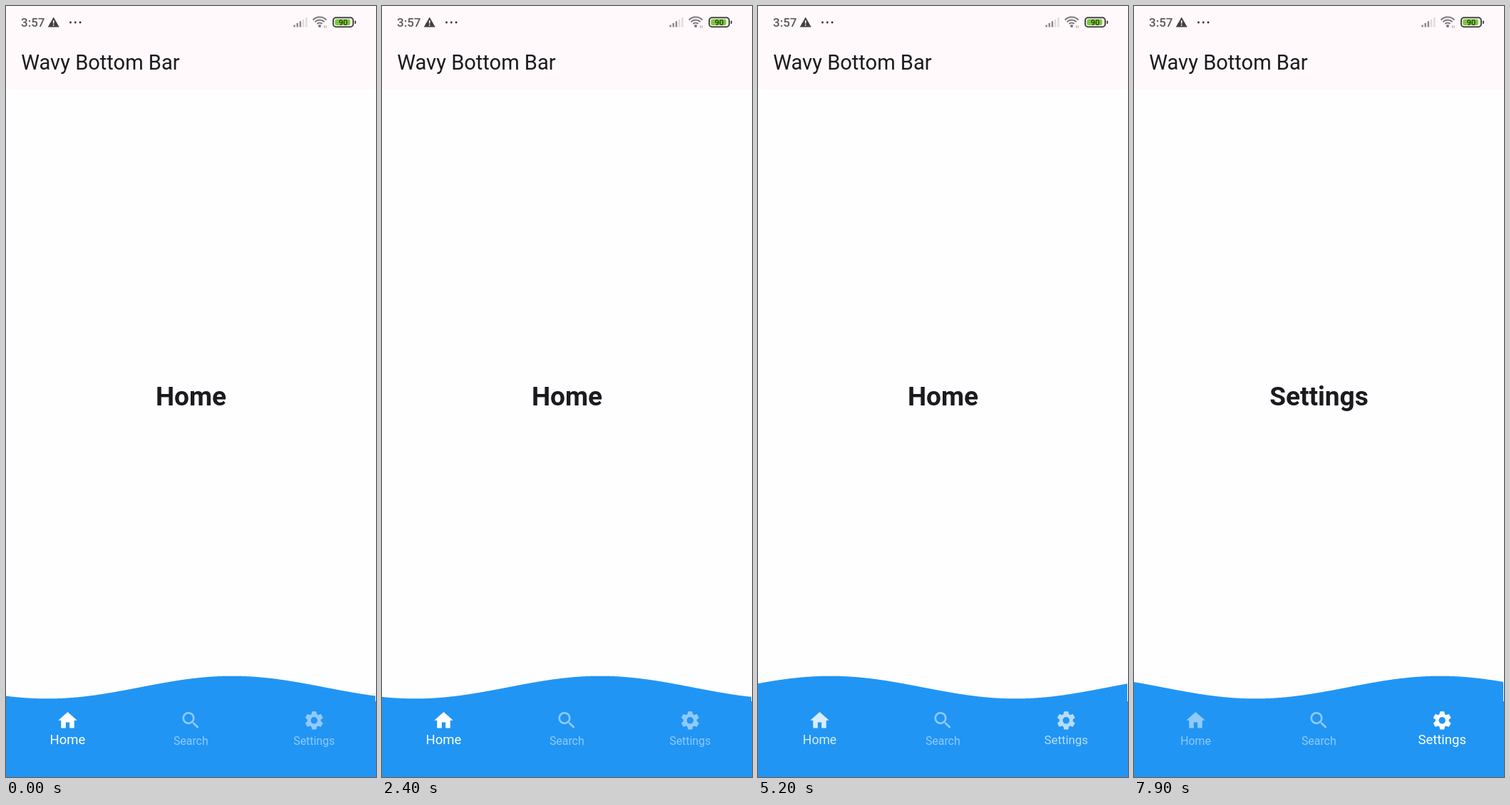
Write an HTML page with a canvas that moves like this. It is 519 px wide and 1079 px high and loops after 8 s.

```html
<!DOCTYPE html>
<html lang="en">
<head>
<meta charset="utf-8">
<title>Wavy Bottom Bar</title>
<style>
html, body { margin: 0; width: 100%; height: 100%; overflow: hidden; background: #fefdff; }
canvas { display: block; }
</style>
</head>
<body>
<canvas id="stage" width="519" height="1079"></canvas>
<script>
const ctx = document.getElementById('stage').getContext('2d');
const W = 519, H = 1079, LOOP = 8000, STEP = 100;
const DP = W / 392.73;
const BLUE = '#2195f4', INK = '#1b1a1f';

function gearPath() {
  const tooth = [[-2.75, -6.65], [-2.39, -9.19], [-1.91, -9.6], [1.91, -9.6], [2.39, -9.19], [2.75, -6.65]];
  const path = new Path2D();
  for (let i = 0; i < 6; i++) {
    const c = Math.cos(i * Math.PI / 3), s = Math.sin(i * Math.PI / 3);
    for (const [x, y] of tooth) path.lineTo(12 + x * c - y * s, 12 + x * s + y * c);
  }
  path.closePath();
  path.moveTo(15.6, 12);
  path.arc(12, 12, 3.6, 0, 7);
  return path;
}

const tabs = [
  { name: 'Home', x: 86.5, icon: new Path2D('M10 20v-6h4v6h5v-8h3L12 3 2 12h3v8z') },
  { name: 'Search', x: 259.3, icon: new Path2D('M15.5 14h-.79l-.28-.27A6.5 6.5 0 1 0 13.73 14.43l.27.28v.79l5 4.99L20.49 19zM9.5 14a4.5 4.5 0 1 1 0-9 4.5 4.5 0 0 1 0 9z') },
  { name: 'Settings', x: 432.2, icon: gearPath() }
];

// [time, tab]
const taps = [[-1000, 0], [3670, 1], [4430, 2], [5116, 0], [5850, 1], [6800, 2]];

// [time, x of the wave's trough]; the pace drifts slightly
const drift = [[0, 577], [300, 577], [1700, 235], [3200, -169], [4100, -403], [5200, -677], [6200, -941], [7900, -1387]];

// cubic-bezier(.4, 0, .2, 1)
function ease(p) {
  if (p >= 1) return 1;
  let lo = 0, hi = 1, s;
  for (let i = 0; i < 20; i++) {
    s = (lo + hi) / 2;
    const x = 1.2 * (1 - s) ** 2 * s + 0.6 * (1 - s) * s * s + s ** 3;
    if (x < p) lo = s; else hi = s;
  }
  return s * s * (3 - 2 * s);
}

function troughAt(t) {
  const i = drift.findIndex(([time]) => time >= t);
  if (i < 1) return drift[0][1];
  const [t0, x0] = drift[i - 1], [t1, x1] = drift[i];
  return x0 + (x1 - x0) * (t - t0) / (t1 - t0);
}

function text(str, x, y, size, color, weight = 400, align = 'center') {
  ctx.font = `${weight} ${size}px Roboto, sans-serif`;
  ctx.textAlign = align;
  ctx.fillStyle = color;
  ctx.fillText(str, x, y);
}

function rect(x, y, w, h, color) {
  ctx.fillStyle = color;
  ctx.fillRect(x, y, w, h);
}

function rounded(x, y, w, h, r) {
  ctx.beginPath();
  ctx.roundRect(x, y, w, h, r);
}

function dot(x, y, r, color) {
  ctx.fillStyle = color;
  ctx.beginPath();
  ctx.arc(x, y, r, 0, 7);
  ctx.fill();
}

function drawStatus() {
  text('3:57', 21, 29, 17, '#5c5a5d', 500, 'left');

  ctx.fillStyle = '#434145';
  ctx.fill(new Path2D('M66.7 15.5L74.7 29.5H58.7z'));
  rect(65.9, 20, 1.6, 4.6, '#fff9fc');
  rect(65.9, 26, 1.6, 1.6, '#fff9fc');
  for (let i = 0; i < 3; i++) dot(90.5 + i * 6.8, 23, 1.4, '#29282b');

  for (let i = 0; i < 5; i++) {
    const h = 3 + i * 2.6;
    rect(403.3 + i * 4.2, 29.5 - h, 2.4, h, i < 3 ? '#89868a' : '#dedadd');
  }

  ctx.strokeStyle = '#79777b';
  ctx.lineWidth = 2;
  for (const r of [5, 9, 13]) {
    ctx.beginPath();
    ctx.arc(440, 28.5, r, -Math.PI * 0.76, -Math.PI * 0.24);
    ctx.stroke();
  }
  dot(440, 28, 2, '#79777b');
  rect(446, 27, 1, 4, '#a5a2a6');
  rect(448.5, 27, 1, 4, '#a5a2a6');

  ctx.strokeStyle = '#474648';
  rounded(459, 16.2, 28, 13, 4);
  ctx.stroke();
  ctx.fillStyle = '#7bcb35';
  rounded(461.3, 18.5, 21.5, 8.6, 2);
  ctx.fill();
  ctx.fillStyle = '#474648';
  rounded(489, 20.5, 2, 4.5, 1);
  ctx.fill();
  text('90', 473, 26.8, 11, '#26351a', 500);
}

function drawWave(trough) {
  ctx.fillStyle = BLUE;
  ctx.beginPath();
  ctx.moveTo(0, 974);
  for (let x = 0; x <= W - 1; x++) {
    ctx.lineTo(x, 953.5 + 12 * DP * Math.cos(2 * Math.PI * (x - trough) / W));
  }
  ctx.lineTo(W - 1, 974);
  ctx.fill();
  rect(0, 973, W, H - 973, BLUE);
}

function drawTab({ name, x, icon }, on) {
  const color = `rgba(255,255,255,${0.5 + 0.5 * on})`;
  const size = (12 + 2 * on) * DP;
  ctx.save();
  ctx.translate(x - 12 * DP, 984);
  ctx.scale(DP, DP);
  ctx.fillStyle = color;
  ctx.fill(icon, 'evenodd');
  ctx.restore();
  text(name, x, 1037.5 - size * 0.244, size, color);
}

function draw(t) {
  const now = taps.findLastIndex(([time]) => time <= t);
  const [start, current] = taps[now];
  const previous = now ? taps[now - 1][1] : -1;
  const p = ease((t - start) / 200);

  rect(0, 0, W, H, '#fefdff');
  rect(0, 0, W, 116, '#fff9fc');
  drawStatus();
  text('Wavy Bottom Bar', 21.2, 89, 22 * DP, INK, 400, 'left');
  text(tabs[current].name, 259.5, 558.7, 28 * DP, INK, 700);
  drawWave(troughAt(t));
  tabs.forEach((tab, i) => drawTab(tab, i === current ? p : i === previous ? 1 - p : 0));
}

function frame() {
  const t = performance.now() % LOOP;
  draw(Math.floor(t / STEP) * STEP);
  requestAnimationFrame(frame);
}
frame();
</script>
</body>
</html>
```
